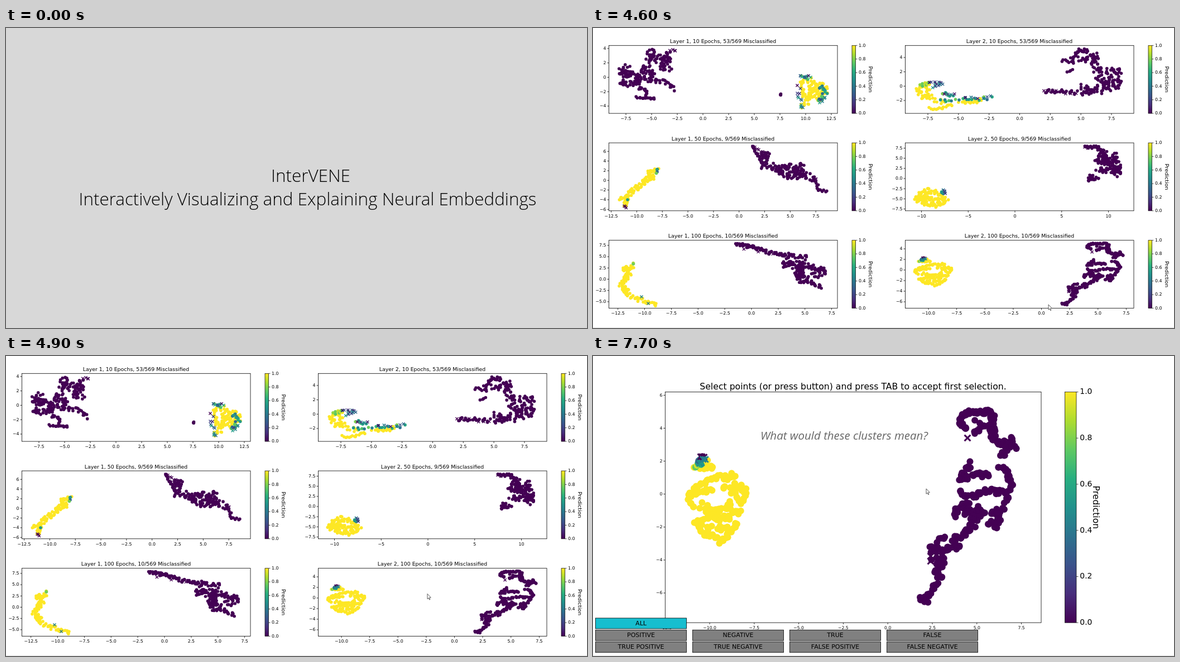
Animation, 1041 px wide and 538 px high, one loop 8000 ms. Source, as an HTML page with a canvas:

```html
<!DOCTYPE html>
<html lang="en">
<head>
<meta charset="utf-8">
<title>Neural embeddings</title>
<style>
html, body { margin: 0; width: 100%; height: 100%; overflow: hidden; background: #fff; }
canvas { display: block; width: 1041px; height: 538px; }
</style>
</head>
<body>
<canvas id="stage" width="1041" height="538"></canvas>
<script>
const W = 1041, H = 538, LOOP = 8000;
const SANS = '"DejaVu Sans", sans-serif';
const HUMAN = '"Open Sans", "Noto Sans", sans-serif';
const VIRIDIS = ['#440154', '#472d7b', '#3b528b', '#2c728e', '#21918c', '#28ae80', '#5ec962', '#addc30', '#fde725'];

// Linear mix of the two nearest stops
function viridis(v) {
  const p = v * 8, i = Math.min(7, Math.floor(p));
  const part = (s, k) => parseInt(s.substr(1 + 2 * k, 2), 16);
  const c = [0, 1, 2].map(k => {
    const a = part(VIRIDIS[i], k);
    return Math.round(a + (part(VIRIDIS[i + 1], k) - a) * (p - i));
  });
  return `rgb(${c})`;
}

function random(seed) {
  let s = seed | 0;
  return () => {
    s = (s + 0x6D2B79F5) | 0;
    let t = Math.imul(s ^ (s >>> 15), 1 | s);
    t = (t + Math.imul(t ^ (t >>> 7), 61 | t)) ^ t;
    return ((t ^ (t >>> 14)) >>> 0) / 4294967296;
  };
}

function text(g, str, x, y, size, align = 'center', o = {}) {
  g.save();
  g.translate(x, y);
  if (o.turn) g.rotate(Math.PI / 2);
  g.font = `${o.style || ''} ${size}px ${o.family || SANS}`;
  g.textAlign = align;
  g.textBaseline = o.base || 'alphabetic';
  g.fillStyle = o.color || '#000';
  g.fillText(str, 0, 0);
  g.restore();
}

function line(g, x0, y0, x1, y1) {
  g.beginPath();
  g.moveTo(x0, y0);
  g.lineTo(x1, y1);
  g.stroke();
}

function dot(g, x, y, r) {
  g.beginPath();
  g.arc(x, y, r, 0, 7);
  g.fill();
}

function cross(g, x, y, r) {
  const a = r * 0.9;
  g.lineWidth = a * 0.55;
  line(g, x - a, y - a, x + a, y + a);
  line(g, x - a, y + a, x + a, y - a);
}

// A brush spreads n marks evenly along a path, each shifted by up to s
let pen;
const brush = (lo, hi, mark) => (n, s, ...p) => {
  const { g, r, map } = pen, rnd = random(n * 977 + p[0] * 31 + p[1]);
  const len = [0];
  for (let i = 2; i < p.length; i += 2) {
    len.push(len[len.length - 1] + Math.hypot(p[i] - p[i - 2], p[i + 1] - p[i - 1]));
  }
  const total = len[len.length - 1];
  for (let i = 0; i < n; i++) {
    let [x, y] = p;
    if (total) {
      const d = (n > 1 ? i / (n - 1) : 0) * total;
      const j = Math.max(1, len.findIndex(l => l >= d - 1e-6));
      const f = (d - len[j - 1]) / (len[j] - len[j - 1]);
      x = p[2 * j - 2] + (p[2 * j] - p[2 * j - 2]) * f;
      y = p[2 * j - 1] + (p[2 * j + 1] - p[2 * j - 1]) * f;
    }
    const a = rnd() * Math.PI * 2, q = Math.sqrt(rnd()) * s;
    g.fillStyle = g.strokeStyle = viridis(lo + (hi - lo) * rnd());
    mark(g, ...map(x + Math.cos(a) * q, y + Math.sin(a) * q), r);
  }
};
const dark = brush(0, 0, dot), gold = brush(1, 1, dot);
const mixed = brush(0.3, 0.8, dot), green = brush(0.6, 0.95, dot);
const darkX = brush(0, 0, cross), mixedX = brush(0, 0.6, cross), tealX = brush(0.4, 0.55, cross);

function early1() {
  dark(44, 6, 97, 44, 110, 42, 98, 58, 109, 58, 126, 51, 138, 43);
  dark(30, 6, 127, 56, 138, 58, 122, 69, 137, 76);
  dark(36, 6, 100, 66, 86, 75, 108, 82, 92, 94);
  dark(58, 6, 62, 70, 51, 72, 53, 86, 70, 80, 52, 98, 72, 100);
  dark(30, 6, 76, 87, 88, 88, 74, 102);
  dark(22, 4, 100, 94, 127, 95, 147, 110);
  dark(17, 3, 82, 107, 94, 112, 96, 126);
  dark(14, 2, 78, 124, 111, 127);
  dark(3, 2, 335, 119);
  gold(50, 5, 413, 103, 389, 94, 373, 99, 376, 116, 387, 131, 375, 141);
  gold(66, 7, 393, 104, 388, 120, 404, 112, 417, 111, 406, 129);
  mixed(6, 3, 375, 87, 386, 91);
  mixed(16, 6, 406, 106, 418, 112, 408, 132);
  darkX(4, 2, 138, 39, 148, 41);
  darkX(1, 0, 366, 103);
  mixedX(8, 2, 371, 87, 389, 87);
  mixedX(11, 4, 370, 112, 369, 125, 375, 145);
  mixedX(5, 3, 414, 122, 408, 134);
}

function early2() {
  dark(54, 6, 855, 56, 871, 41, 886, 42, 900, 49, 899, 60, 872, 55);
  dark(10, 3, 841, 59, 862, 62);
  dark(4, 2, 849, 80, 858, 74);
  dark(50, 6, 897, 61, 908, 77, 941, 77, 945, 97, 935, 108);
  dark(62, 8, 904, 82, 909, 105, 922, 90, 937, 94, 915, 114);
  dark(32, 5, 875, 106, 903, 112, 876, 118);
  dark(24, 4, 809, 113, 866, 116);
  gold(34, 5, 600, 103, 580, 113, 592, 123, 604, 124);
  gold(18, 4, 598, 107, 607, 129, 632, 133);
  gold(15, 2, 603, 144, 615, 146, 644, 138);
  gold(18, 4, 658, 135, 696, 129);
  green(8, 3, 588, 102, 602, 99);
  mixed(7, 3, 629, 117, 645, 121);
  mixed(18, 4, 625, 132, 664, 129, 714, 126);
  darkX(7, 3, 808, 112, 866, 118);
  mixedX(16, 3, 605, 98, 627, 98, 610, 106);
  mixedX(4, 2, 630, 117, 647, 120);
  mixedX(7, 3, 667, 126, 714, 123);
}

function middle1() {
  dark(15, 2, 286, 212, 297, 231);
  dark(40, 5, 300, 225, 314, 227, 300, 238, 314, 238, 303, 249);
  dark(82, 7, 314, 246, 333, 253, 348, 248, 374, 249, 374, 260, 345, 264);
  dark(40, 6, 326, 257, 355, 267, 384, 264, 398, 271);
  dark(15, 2, 394, 274, 402, 279, 401, 291, 419, 293);
  gold(26, 4, 115, 255, 98, 259, 106, 273);
  gold(62, 6, 105, 263, 86, 280, 72, 292, 60, 303);
  gold(22, 4, 49, 307, 60, 307, 57, 318);
  mixed(4, 2, 115, 253, 114, 261);
  mixed(1, 0, 62, 308);
  darkX(6, 2, 287, 212, 305, 223);
  darkX(2, 1, 399, 271);
  darkX(3, 1, 57, 319, 60, 322);
}

function middle2() {
  dark(22, 3, 881, 213, 903, 214, 916, 221);
  dark(100, 8, 908, 222, 921, 229, 905, 238, 925, 243, 935, 229, 938, 255);
  dark(48, 6, 906, 252, 922, 257, 943, 250, 938, 264);
  dark(24, 5, 890, 275, 892, 267, 902, 272);
  gold(58, 5, 619, 298, 605, 291, 582, 299, 581, 309, 601, 300);
  gold(66, 5, 586, 311, 596, 307, 633, 308, 620, 317, 594, 317);
  gold(8, 3, 620, 299, 630, 303);
  mixed(5, 3, 625, 292, 631, 296);
  darkX(4, 2, 880, 212, 890, 215);
  mixedX(6, 3, 627, 291, 632, 294);
}

function late1() {
  dark(50, 4, 259, 387, 280, 393, 300, 396, 320, 404);
  dark(36, 4, 322, 403, 340, 406, 381, 411);
  dark(36, 6, 354, 413, 341, 425, 360, 423, 377, 418);
  dark(64, 7, 362, 431, 376, 433, 365, 445, 382, 446);
  dark(46, 6, 381, 427, 417, 435, 395, 445);
  dark(26, 4, 370, 455, 385, 454, 408, 465);
  gold(50, 5, 70, 430, 57, 431, 64, 442, 55, 455);
  gold(30, 5, 50, 461, 60, 471);
  gold(38, 4, 60, 474, 72, 484, 94, 490, 114, 496);
  green(3, 1, 72, 422);
  darkX(3, 1, 270, 396, 322, 405);
  tealX(2, 0, 87, 482, 99, 494);
}

// The last embedding, in the coordinates of the large view
function late2() {
  dark(44, 4, 670, 131, 657, 120, 662, 106, 676, 101, 708, 100, 716, 106);
  dark(28, 6, 713, 108, 717, 148);
  dark(12, 5, 682, 137, 700, 126, 688, 117);
  dark(32, 6, 718, 150, 756, 164, 753, 146, 733, 179);
  dark(34, 5, 677, 192, 657, 222, 686, 210, 713, 215);
  dark(19, 5, 728, 200, 742, 207, 750, 233);
  dark(30, 5, 657, 241, 674, 253, 704, 242, 738, 245);
  dark(26, 5, 747, 240, 742, 262, 732, 276, 722, 306, 708, 298);
  dark(42, 8, 649, 281, 668, 264, 673, 286, 690, 280, 681, 300);
  dark(12, 6, 687, 266, 702, 283, 728, 278);
  dark(16, 5, 680, 303, 664, 321, 648, 325);
  dark(32, 6, 629, 325, 603, 351, 654, 345, 645, 329);
  dark(28, 8, 608, 370, 630, 363, 614, 382, 624, 397);
  dark(20, 3, 617, 405, 600, 431, 587, 435, 600, 442);
  gold(13, 4, 207, 187, 201, 201, 215, 198, 183, 203);
  gold(28, 4, 226, 214, 196, 229, 176, 244, 173, 262, 181, 272);
  gold(32, 6, 234, 220, 249, 214, 253, 228, 277, 240, 262, 262);
  gold(10, 5, 232, 234, 247, 240, 258, 253);
  gold(10, 4, 182, 249, 210, 239);
  gold(32, 7, 193, 268, 218, 281, 243, 267, 264, 286);
  gold(22, 6, 185, 299, 209, 289, 247, 292);
  gold(28, 5, 190, 304, 202, 318, 232, 334, 258, 299);
  gold(10, 6, 205, 307, 248, 307);
  green(5, 2, 185, 198, 192, 194);
  mixed(4, 2, 188, 190, 193, 186);
  dark(2, 1, 195, 181);
  darkX(3, 1, 192, 181, 199, 181);
  tealX(4, 2, 192, 193, 200, 184);
  darkX(1, 0, 671, 147);
  darkX(2, 0, 605, 359, 605, 368);
}

function scatter(g, plot, r, map = (x, y) => [x, y]) {
  pen = { g, r, map };
  plot();
}

// axis: first tick, last tick, step, position of zero, pixels per unit, decimals
const axis = (first, last, step, zero, scale, digits) => put => {
  for (let v = first; v <= last; v += step) {
    put(zero + v * scale, v.toFixed(digits).replace('-', '\u2212'));
  }
};

function axes(g, x, y, w, h, ax, ay, size) {
  g.strokeStyle = '#000';
  g.lineWidth = 0.8;
  g.strokeRect(x, y, w, h);
  ax((p, s) => {
    line(g, p, y + h, p, y + h + 3);
    text(g, s, p, y + h + 11.8, size);
  });
  ay((p, s) => {
    line(g, x - 3, p, x, p);
    text(g, s, x - 5, p + 0.3, size, 'right', { base: 'middle' });
  });
}

function colorbar(g, x, y, w, h, tick, size, labelSize, labelX) {
  const grad = g.createLinearGradient(0, y + h, 0, y);
  VIRIDIS.forEach((c, i) => grad.addColorStop(i / 8, c));
  g.fillStyle = grad;
  g.fillRect(x, y, w, h);
  g.strokeStyle = '#000';
  g.lineWidth = 0.7;
  g.strokeRect(x, y, w, h);
  for (let i = 0; i <= 5; i++) {
    const p = y + h - h * i / 5;
    line(g, x + w, p, x + w + tick, p);
    text(g, (i / 5).toFixed(1), x + w + tick * 1.8, p + 0.3, size, 'left', { base: 'middle' });
  }
  text(g, 'Prediction', labelX, y + h / 2, labelSize, 'center', { turn: true, base: 'middle' });
}

function page(g) {
  g.fillStyle = '#fff';
  g.fillRect(0, 0, W, H);
  g.fillStyle = '#e3e3e3';
  g.fillRect(0, 537, W, 1);
}

function panel(g, col, row, plot, ax, ay, map) {
  const x = 28.5 + col * 531, y = 31.3 + row * 174.7;
  const epochs = [10, 50, 100][row], wrong = [53, 9, 10][row];
  scatter(g, plot, 2.8, map);
  axes(g, x, y, 409.5, 121.8, ax, ay, 7.85);
  text(g, `Layer ${col + 1}, ${epochs} Epochs, ${wrong}/569 Misclassified`, x + 204.5, y - 4.5, 9.4);
  colorbar(g, x + 435.5, y, 6.5, 121.8, 3, 7.85, 9.5, x + 468);
}

function overview(g) {
  page(g);
  panel(g, 0, 0, early1, axis(-7.5, 12.5, 2.5, 197, 18.4, 1), axis(-4, 4, 2, 88.4, -12.9, 0));
  panel(g, 1, 0, early2, axis(-7.5, 7.5, 2.5, 764.5, 21.93, 1), axis(-2, 4, 2, 104.3, -12.85, 0));
  panel(g, 0, 1, middle1, axis(-12.5, 7.5, 2.5, 261.7, 18.33, 1), axis(-6, 6, 2, 273.3, -8.67, 0));
  panel(g, 1, 1, middle2, axis(-10, 10, 5, 756, 16.75, 0), axis(-7.5, 7.5, 2.5, 270, -7.27, 1));
  panel(g, 0, 2, late1, axis(-12.5, 7.5, 2.5, 284, 19.15, 1), axis(-5, 7.5, 2.5, 450.5, -8.08, 1));
  panel(g, 1, 2, late2, axis(-10, 7.5, 2.5, 803.5, 20.25, 1), axis(-6, 4, 2, 434, -9.5, 0),
    (x, y) => [803.5 + (x - 528.2) * 0.6346, 434 + (y - 247.7) * 0.3215]);
}

function button(g, label, col, row) {
  const x = 4.5 + col * 174, y = 470 + row * 21.3;
  g.fillStyle = row ? '#808080' : '#17becf';
  g.fillRect(x, y, 163, 19);
  g.strokeStyle = '#000';
  g.lineWidth = 0.8;
  g.strokeRect(x, y, 163, 19);
  text(g, label, x + 81.5, y + 12.8, 11);
}

function detail(g) {
  page(g);
  scatter(g, late2, 6);
  axes(g, 129.3, 64.5, 673.7, 413.7, axis(-12.5, 7.5, 2.5, 528.2, 31.91, 1),
    axis(-6, 6, 2, 247.7, -29.55, 0), 7.7);
  text(g, 'Select points (or press button) and press TAB to accept first selection.', 466, 59.5, 15.7);
  text(g, 'What would these clusters mean?', 450, 150, 20.5, 'center',
    { family: HUMAN, style: 'italic', color: '#686868' });
  colorbar(g, 845.5, 64.5, 20.5, 413.7, 3.5, 13.9, 15.6, 900.5);
  button(g, 'ALL', 0, 0);
  ['POSITIVE', 'NEGATIVE', 'TRUE', 'FALSE'].forEach((s, i) => button(g, s, i, 1));
  ['TRUE POSITIVE', 'TRUE NEGATIVE', 'FALSE POSITIVE', 'FALSE NEGATIVE']
    .forEach((s, i) => button(g, s, i, 2));
}

function intro(g) {
  g.fillStyle = '#d8d8d8';
  g.fillRect(0, 0, W, H);
  const o = { family: HUMAN, style: '300' };
  text(g, 'InterVENE', 546, 276, 31.4, 'center', o);
  text(g, 'Interactively Visualizing and Explaining Neural Embeddings', 540.5, 318, 31.4, 'center', o);
}

const ARROW = new Path2D('M0 0V9.3L2.1 7.4L3.6 10.7L4.9 10.1L3.5 6.9L6.3 6.7Z');

function cursor(g, x, y) {
  g.save();
  g.translate(x, y);
  g.fillStyle = '#fff';
  g.fill(ARROW);
  g.strokeStyle = '#333';
  g.lineWidth = 0.8;
  g.stroke(ARROW);
  g.restore();
}

function layer(draw) {
  const c = document.createElement('canvas');
  c.width = W;
  c.height = H;
  draw(c.getContext('2d'));
  return c;
}

const stage = document.getElementById('stage').getContext('2d');
const [introLayer, overviewLayer, detailLayer] = [intro, overview, detail].map(layer);
const start = performance.now();

function frame() {
  const t = (performance.now() - start) % LOOP;
  stage.drawImage(t < 1000 ? introLayer : t < 7700 ? overviewLayer : detailLayer, 0, 0);
  if (t >= 7700) {
    cursor(stage, 597, 238);
  } else if (t >= 4600) {
    const k = Math.min(3, Math.floor((t - 4600) / 100)) / 3;
    if (t >= 5700) {
      stage.fillStyle = 'rgba(255, 250, 80, 0.7)';
      dot(stage, 753.5, 426.5, 7.2);
    }
    cursor(stage, 816 - 61 * k, 496 - 69.5 * k);
  }
  requestAnimationFrame(frame);
}
frame();
</script>
</body>
</html>
```
